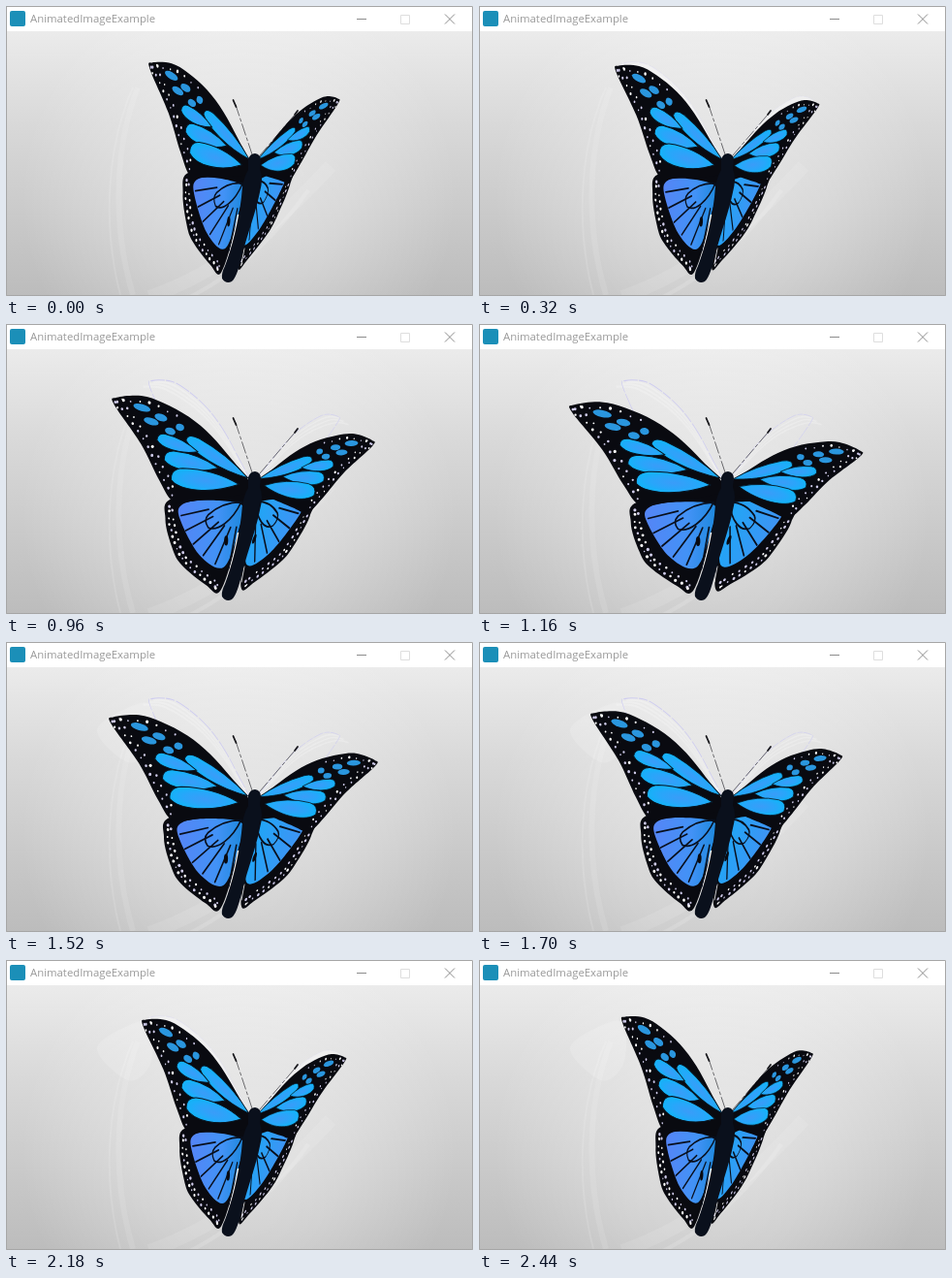
Animation of 482 by 299 pixels, one loop 2.49 s. Source, as an HTML page:

```html
<!DOCTYPE html>
<html lang="en">
<head>
<meta charset="utf-8">
<title>AnimatedImageExample</title>
<style>
  html, body { margin: 0; width: 100%; height: 100%; overflow: hidden; background: #fff; }
  svg { display: block; width: 482px; height: 299px; }
  text { font: 11.35px "Open Sans", "Noto Sans", sans-serif; fill: #999; }
  .dark { fill: #090a10; }
  .cell { fill: url(#cyan); stroke: #07131f; stroke-width: 1; }
  .vein { fill: none; stroke: #090f1c; stroke-width: 1.7; stroke-linecap: round; }
</style>
</head>
<body>
<svg viewBox="0 0 482 299" xmlns="http://www.w3.org/2000/svg">
  <defs>
    <linearGradient id="sky" x2="0" y2="1">
      <stop offset="0" stop-color="#f0f0f0"/>
      <stop offset=".4" stop-color="#d9d9d9"/>
      <stop offset="1" stop-color="#bcbcbc"/>
    </linearGradient>
    <radialGradient id="glow" gradientUnits="userSpaceOnUse" cx="240" cy="195" r="225">
      <stop offset="0" stop-color="#fff" stop-opacity=".45"/>
      <stop offset=".5" stop-color="#fff" stop-opacity=".27"/>
      <stop offset="1" stop-color="#fff" stop-opacity="0"/>
    </radialGradient>
    <radialGradient id="cyan">
      <stop offset="0" stop-color="#3a9cf8"/>
      <stop offset=".6" stop-color="#28a6fa"/>
      <stop offset="1" stop-color="#14b2f8"/>
    </radialGradient>
    <linearGradient id="blue-left">
      <stop offset="0" stop-color="#5585f6"/>
      <stop offset=".6" stop-color="#4292f6"/>
      <stop offset="1" stop-color="#1c88dc"/>
    </linearGradient>
    <linearGradient id="blue-right">
      <stop offset="0" stop-color="#3f93f4"/>
      <stop offset="1" stop-color="#1ca8f6"/>
    </linearGradient>
  </defs>

  <rect width="482" height="299" fill="url(#sky)"/>
  <rect y="26" width="482" height="273" fill="url(#glow)"/>
  <g fill="none" stroke="#fff">
    <path d="M131 84C106 140 98 220 118 298" stroke-opacity=".12" stroke-width="2"/>
    <path d="M136 84C114 140 108 220 131 298" stroke-opacity=".1" stroke-width="6"/>
    <path d="M148 300C220 275 275 230 335 165" stroke-opacity=".1" stroke-width="14"/>
    <path d="M190 300C240 275 280 235 312 190" stroke-opacity=".14" stroke-width="4"/>
  </g>

  <rect width="482" height="26" fill="#fff"/>
  <rect x="4" y="5" width="16" height="16" rx="2" fill="#1b8fb8"/>
  <text x="25" y="17">AnimatedImageExample</text>
  <g fill="none" stroke="#8c8c8c">
    <path d="M362 13.5h10"/>
    <path d="M407.5 9.5h9v9h-9z" stroke="#dedede"/>
    <path d="M453 8.5l10 10m0-10l-10 10"/>
  </g>

  <g transform="translate(257 155)">
    <g id="trail"></g>
    <g id="left"></g>
    <g id="right"></g>
  </g>

  <g fill="none" stroke="#fff" stroke-linecap="round">
    <path d="M240 216Q235 246 227 270" stroke-width="2.6"/>
    <path d="M246 250L243 266" stroke-opacity=".8"/>
  </g>
  <path fill="#0a101c" d="M250 158Q252 152 257 152Q263 153 263 159L262 168Q266 177 262 192C258 212 249 236 245 252C241 268 238 280 233 284Q227 287 223 281Q222 276 226 268C233 250 240 222 243 197Q244 178 250 169Z"/>
  <g fill="none" stroke="#17171b" stroke-linecap="round">
    <path d="M254 153L237 102M262 154L298 112" stroke-width=".6" stroke-dasharray="12 3 3 3"/>
    <path d="M234.5 97L237.5 104M298 112L301 108" stroke-width="1.8"/>
  </g>
  <path d="M.5 0V298.5H481.5V.5H0" fill="none" stroke="#a6a6a6"/>
</svg>
<script>
const LOOP = 2490, STEPS = 54;
const $ = id => document.getElementById(id);
const lerp = (a, b, u) => a + (b - a) * u;
const times = (n, f) => Array.from({ length: n }, (_, i) => f(i, i / (n - 1))).join("");

let seed = 7;
const rand = () => (seed = seed * 16807 % 2147483647) / 2147483647;

// Smooth closed curve through "x,y x,y ..." points
function curve(pts) {
  const p = pts.split(" ").map(s => s.split(",").map(Number));
  const at = i => p[(i + p.length) % p.length];
  const mix = (a, b, c) => [0, 1].map(k => a[k] + (c[k] - b[k]) / 6);
  return "M" + p[0] + p.map((b, i) => {
    const a = at(i - 1), c = at(i + 1), d = at(i + 2);
    return `C${mix(b, a, c)} ${mix(c, d, b)} ${c}`;
  }).join("") + "Z";
}

// Tapered cell from a pointed base to a blunt end
function petal(x, y, endX, endY, w, cls = "cell") {
  const l = Math.hypot(endX - x, endY - y);
  const turn = Math.atan2(endY - y, endX - x) * 180 / Math.PI;
  return `<path class="${cls}" transform="translate(${x} ${y}) rotate(${turn})" d="M0 0` +
    `C${l * .4} ${-w * .7} ${l * .85} ${-w * .75} ${l} ${-w * .25}` +
    `Q${l * 1.03} ${w * .3} ${l * .85} ${w * .42}Q${l * .4} ${w * .6} 0 0Z"/>`;
}

// Pale specks just inside a stretch of an outline
function specks(d, from, to, inset, n) {
  const path = document.createElementNS("http://www.w3.org/2000/svg", "path");
  path.setAttribute("d", d);
  const size = path.getTotalLength();
  return times(n, (i, u) => {
    const s = size * lerp(from, to, u);
    const p = path.getPointAtLength(s), q = path.getPointAtLength(s + 1);
    const depth = inset + rand() * 1.5;
    return `<circle cx="${p.x + (q.y - p.y) * depth}" cy="${p.y - (q.x - p.x) * depth}"
      r="${.8 + rand() * .9}" fill="${rand() < .5 ? "#fff" : "#cfcbea"}"/>`;
  });
}

// Left wing, fully open, measured from the head
const FORE = curve("-6,8 -27,-14 -51,-37 -77,-55 -107,-68 -132,-74 -160,-71 -163,-64 -131,-25 -109,11 -92,32 -67,30 -7,19");
const HIND = curve("-92,28 -101,50 -92,80 -81,96 -53,115 -36,120 -19,70 -7,17");
const PANEL = curve("-83,35 -57,29 -14,32 -17,57 -33,96 -61,85 -84,50");

const foreWing = `<path class="dark" d="${FORE}"/>` +
  petal(-8, 4, -78, -34, 14) +
  times(3, (i, u) => petal(lerp(-66, -18, u), lerp(-20, 11, u),
    lerp(-112, -95, u), lerp(-33, 5, u), lerp(13, 20, u))) +
  times(5, i => `<ellipse fill="#2a96de" rx="${10 - 1.3 * i}" ry="3.6"
    transform="translate(${-131 + 11 * i} ${-62 + 4.5 * i + i % 2 * 9}) rotate(12)"/>`) +
  specks(FORE, .42, .74, 4, 15) + specks(FORE, .44, .72, 9.5, 11) + specks(FORE, .26, .4, 5, 6);

const hindWing = side => `<path class="dark" d="${HIND}"/>` +
  `<path d="${PANEL}" fill="url(#blue-${side})"/>` +
  petal(-15, 29, -54, 53, 17, "vein") +
  times(6, (i, u) => {
    const a = lerp(2.9, 1.75, u), x = Math.cos(a), y = Math.sin(a), r = lerp(38, 26, u);
    return `<path class="vein" d="M${-15 + x * r} ${29 + y * r}L${-15 + x * 70} ${29 + y * 70}"/>`;
  }) +
  `<ellipse class="dark" cx="-31" cy="69" rx="2.3" ry="5"/>` +
  specks(HIND, .04, .39, 4, 18) + specks(HIND, .06, .38, 8.5, 14);

// shift: how far the tip travels; g: share of it for each point;
// fore, hind: how the left shapes map onto this side
const wings = {
  left: { shift: [-55, 26], g: [-.00551, -.00147], fore: [1, 0, 0, 1], hind: [1, 0, 0, 1] },
  right: { shift: [52, 36], g: [.00751, .00156],
    fore: [-.762, -.211, -.213, .811], hind: [-.83, -.01, -.356, .98] }
};
const matrix = m => `transform="matrix(${m},0,0)"`;

function fold({ shift: [dx, dy], g: [gx, gy] }, open) {
  const c = 1 - open;
  return [1 - c * dx * gx, -c * dy * gx, -c * dx * gy, 1 - c * dy * gy];
}

for (const side in wings) {
  const w = wings[side];
  $(side).innerHTML = `<g ${matrix(w.hind)}>${hindWing(side)}</g><g ${matrix(w.fore)}>${foreWing}</g>`;
}

// Pale traces left where the wings have been
const trace = (open, attr) => Object.values(wings).map(w =>
  `<g ${matrix(fold(w, open))}><path ${matrix(w.fore)} d="${FORE}" pathLength="1" ${attr}/></g>`).join("");
$("trail").innerHTML =
  `<g id="veil">${trace(0, 'fill="#fff"')}</g><g id="rim" fill="none">` +
  times(3, i => trace(.08 + .1 * i, 'stroke="#fff" stroke-opacity=".22" stroke-width="2" stroke-dasharray=".42 1"')) +
  trace(0, 'stroke="#cfcdf0" stroke-dasharray=".03 .004 .05 .006"') + "</g>" +
  `<path id="smear" fill="#fff" fill-opacity=".14" d="${curve("-163,-64 -127,-89 -107,-88 -108,-48 -131,-31")}"/>`;

function draw(ms) {
  const t = ms % LOOP, step = LOOP / STEPS;
  const k = Math.min(STEPS - 1, Math.floor((t + 5) / step));
  const swing = 1 - Math.abs(2 * k / STEPS - 1);
  const open = Math.min(1, 1.1 * swing ** 1.6);
  for (const side in wings) $(side).setAttribute("transform", `matrix(${fold(wings[side], open)},0,0)`);
  $("veil").setAttribute("opacity", open < .02 ? 0 : Math.max(.05, .6 - 1.8 * open));
  $("rim").setAttribute("opacity", Math.min(1, Math.max(0, open * 4 - .2)));
  $("smear").setAttribute("opacity", k > STEPS / 2 ? 1 : 0);
}

const start = performance.now();
(function tick() {
  draw(performance.now() - start);
  requestAnimationFrame(tick);
})();
</script>
</body>
</html>
```
